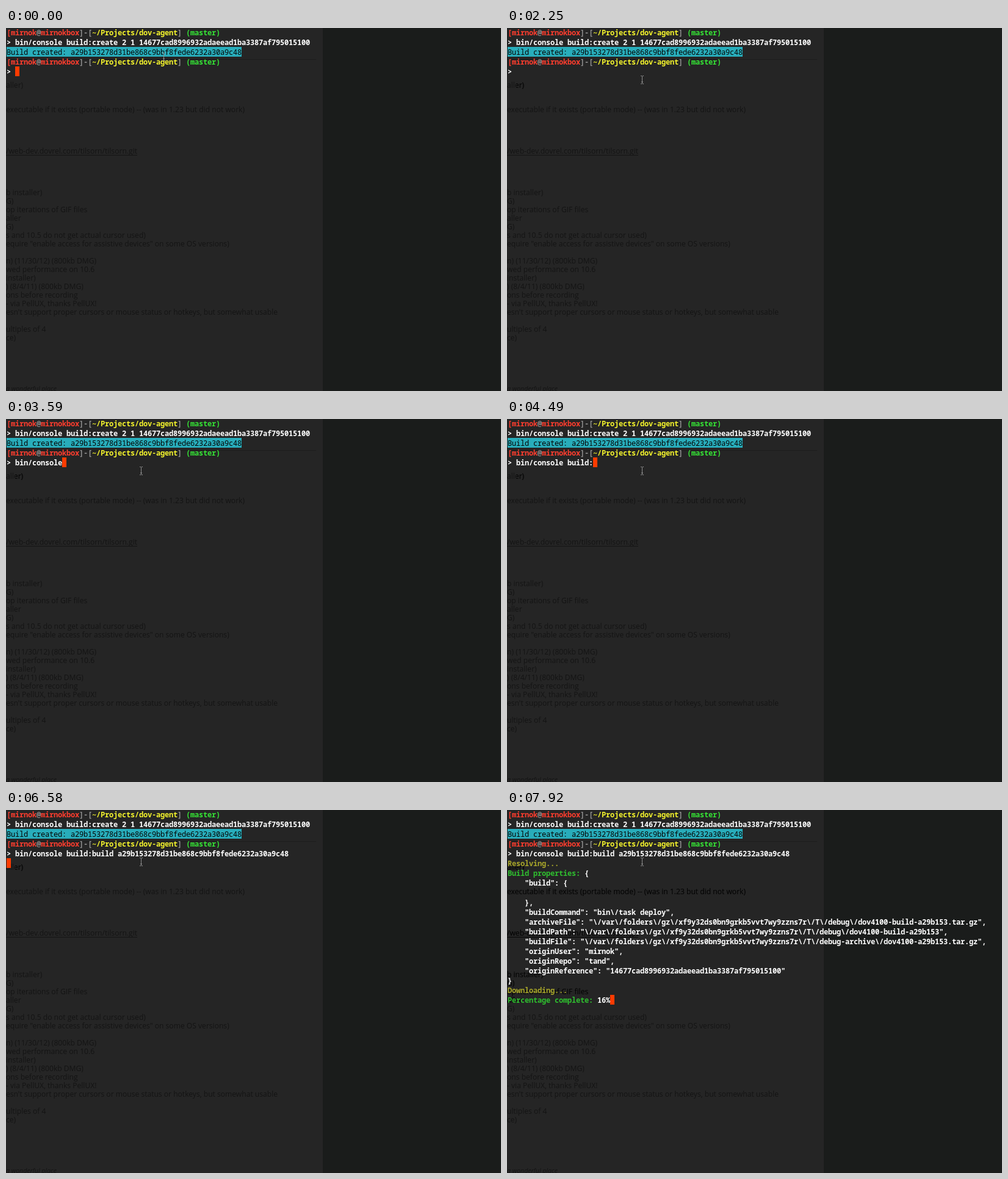
Recreate the animation shown at these times as an HTML page with a canvas. Size 811 px wide and 595 px high, loop 8000 ms.

```html
<!DOCTYPE html>
<html lang="en">
<head>
<meta charset="utf-8">
<title>Terminal session</title>
<style>
html, body { margin: 0; width: 811px; height: 595px; overflow: hidden; background: #1a1c1b; }
canvas { display: block; }
</style>
</head>
<body>
<canvas id="stage" width="811" height="595"></canvas>
<script>
const ctx = document.getElementById('stage').getContext('2d');
const LOOP = 8000, TICK = 149.3, CELL = 7, ROW = 16;
const WHITE = '#fff', GREY = '#929292', RED = '#ff3d2e', YELLOW = '#f4f42c',
  LIME = '#35e435', GREEN = '#2fbf2f', OLIVE = '#a8a62a', CYAN = '#28adbb', CURSOR = '#ff3b00';

const HASH = 'a29b153278d31be868c9bbf8fede6232a30a9c48';
const COMMIT = '14677cad8996932adaeead1ba3387af795015100';
const COMMAND = 'bin/console build:build ' + HASH;
const TMP = String.raw`\/var\/folders\/gz\/xf9y32ds0bn9grkb5vvt7wy9zzns7r\/T\/debug`;

// Blocks of window text showing faintly through the terminal: [first baseline, lines]
const GHOST = [
  [98, 'aller)'],
  [138, 'executable if it exists (portable mode) -- (was in 1.23 but did not work)'],
  [206, '/web-dev.dovrel.com/tilsorn/tilsorn.git'],
  [274, `b installer)
G)
op iterations of GIF files
aller
G)
s and 10.5 do not get actual cursor used)
equire "enable access for assistive devices" on some OS versions)

n) (11/30/12) (800kb DMG)
wed performance on 10.6
installer)
) (8/4/11) (800kb DMG)
ons before recording
- via PellUX, thanks PellUX!
esn't support proper cursors or mouse status or hotkeys, but somewhat usable

ultiples of 4
ce)`],
  [595, 'a wonderful place']
];

const OUTPUT = String.raw`    "build": {

    },
    "buildCommand": "bin\/task deploy",
    "archiveFile": "${TMP}\/dov4100-build-a29b153.tar.gz",
    "buildPath": "${TMP}\/dov4100-build-a29b153",
    "buildFile": "${TMP}-archive\/dov4100-a29b153.tar.gz",
    "originUser": "mirnok",
    "originRepo": "tand",
    "originReference": "${COMMIT}"
}`.split('\n');

// When things happen, in ms
const SELECT = 450, DESELECT = 1500, TYPE = 2400, PASTE = 5540, BLINK_OFF = 6290,
  ENTER = 6580, REPLY = 6880, DOWNLOAD = 7166;

// Typing bursts: [start, ms per key, keys]
const BURSTS = [[2250, 95, 3], [2740, 95, 12], [4040, 129, 9]];

// Mouse path: [time, x, y]
const PATH = [[0, 258, 47], [1050, 237, 59], [1200, 224, 92], [1800, 221, 85]];

const clamp = (v, lo, hi) => Math.min(Math.max(v, lo), hi);

function typedCount(t) {
  if (t >= PASTE) return COMMAND.length;
  const now = snap(t);
  return BURSTS.reduce((sum, [start, gap, keys]) =>
    sum + clamp(Math.floor((now - start) / gap), 0, keys), 0);
}

function percentAt(t) {
  return t < DOWNLOAD ? '' : Math.round(2 + (snap(t) - DOWNLOAD) / 53) + '%';
}

function pointerAt(t) {
  const now = snap(t);
  const next = PATH.findIndex(p => p[0] > now);
  if (next < 0) return PATH.at(-1).slice(1);
  const [t0, x0, y0] = PATH[next - 1], [t1, x1, y1] = PATH[next];
  const k = (now - t0) / (t1 - t0);
  return [Math.round(x0 + (x1 - x0) * k), Math.round(y0 + (y1 - y0) * k)];
}

function cursorOn(t) {
  if (t < TYPE) return (t + 450) % 1050 < 600;
  return t < BLINK_OFF || t >= ENTER;
}

// The screen refreshes in even ticks.
const snap = t => Math.floor(t / TICK) * TICK;

function fill(color, x, y, w, h) {
  ctx.fillStyle = color;
  ctx.fillRect(x, y, w, h);
}

const cellX = col => 1 + col * CELL;
const rowY = row => row * ROW - 1;

function cells(color, col, row, count) {
  fill(color, cellX(col), rowY(row), count * CELL, ROW);
}

// Prints [text, color] runs on the character grid.
function print(row, runs, weight = 'bold') {
  ctx.font = weight + ' 12px "Noto Sans Mono", "DejaVu Sans Mono", monospace';
  let col = 0;
  for (const [text, color] of runs) {
    ctx.fillStyle = color;
    for (const ch of text) ctx.fillText(ch, cellX(col++), rowY(row) + 13);
  }
}

function prompt(row) {
  print(row, [['[mirnok', RED], ['@', GREY], ['mirnokbox', RED], [']-[', GREY],
    ['~/Projects/dov-agent', YELLOW], ['] ', GREY], ['(master)', LIME]]);
}

function drawGhost(color) {
  ctx.fillStyle = color;
  for (const [top, text] of GHOST) {
    const style = top > 580 ? 'italic 10.5px' : '12.1px';
    ctx.font = style + ' "Open Sans", "Noto Sans", sans-serif';
    text.split('\n').forEach((line, i) => ctx.fillText(line, 0, top + 14 * i));
    if (text[0] === '/') ctx.fillRect(0, top + 2, ctx.measureText(text).width, 1);
  }
}

// Repainted areas show the window text at a darker tone.
function drawDarkGhost(x, y, w, h) {
  ctx.save();
  ctx.beginPath();
  ctx.rect(x, y, w, h);
  ctx.clip();
  drawGhost('#060606');
  ctx.restore();
}

function drawPointer(x, y) {
  const color = '#8c8c8c';
  fill(color, x, y - 6, 1, 12);
  fill(color, x - 1, y + 3, 3, 1);
  for (const end of [y - 7, y + 6]) {
    fill(color, x - 2, end, 2, 1);
    fill(color, x + 1, end, 2, 1);
  }
}

function drawCreated(selected) {
  cells(CYAN, 0, 2, 55);
  if (selected) cells('#4d4d4d', 15, 2, 40);
  print(2, [['Build created: ' + HASH, '#050505']], 'normal');
}

function drawOutput(percent) {
  print(5, [['Resolving...', OLIVE]]);
  print(6, [['Build properties: ', GREEN], ['{', WHITE]]);
  OUTPUT.forEach((line, i) => print(7 + i, [[line, WHITE]]));
  print(18, [['Downloading...', OLIVE]]);
  if (percent) print(19, [['Percentage complete: ', GREEN], [percent, WHITE]]);
}

function draw(t) {
  const replied = t >= REPLY;
  const typed = typedCount(t);
  const percent = percentAt(t);

  fill('#1a1c1b', 0, 0, 811, 595);
  fill('#252525', 0, 0, 519, 595);
  fill('#1c1c1c', 0, 51, 508, 1);
  drawGhost('#141414');
  if (t >= 1200) drawDarkGhost(15, 51, 227, 49);
  if (replied) drawDarkGhost(1, 79, 782, 240);

  prompt(0);
  print(1, [['> bin/console build:create 2 1 ' + COMMIT, WHITE]]);
  drawCreated(t >= SELECT && t < DESELECT);
  prompt(3);
  print(4, [['> ' + COMMAND.slice(0, typed), WHITE]]);
  if (replied) drawOutput(percent);

  if (cursorOn(t)) {
    if (replied) cells(CURSOR, percent ? 21 + percent.length : 0, 19, 1);
    else if (t >= ENTER) cells(CURSOR, 0, 5, 1);
    else cells(CURSOR, 2 + typed, 4, 1);
  }
  drawPointer(...pointerAt(t));
}

const start = performance.now();
function frame() {
  draw((performance.now() - start) % LOOP);
  requestAnimationFrame(frame);
}
frame();
</script>
</body>
</html>
```
